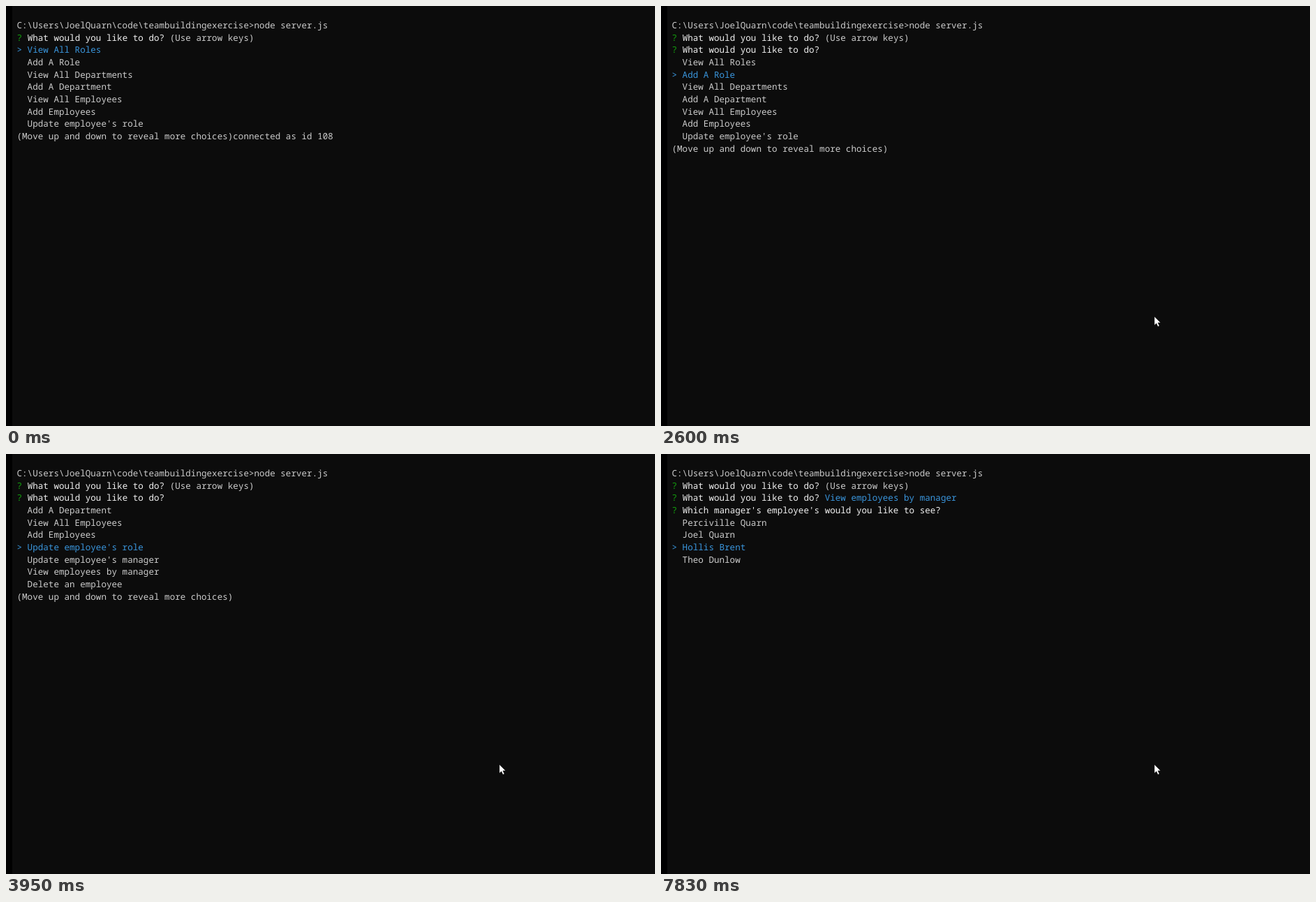
These frames come from a looping animation (930x602 px, 8 s). An HTML page:

```html
<!DOCTYPE html>
<html lang="en">
<head>
<meta charset="utf-8">
<title>Team menu in a terminal</title>
<style>
  html, body { margin: 0; width: 100%; height: 100%; overflow: hidden; background: #0c0c0c; }
  svg { display: block; }
  text {
    font: 12.6px "Noto Sans Mono", "DejaVu Sans Mono", monospace;
    white-space: pre;
    text-rendering: geometricPrecision;
    fill: #ccc;
  }
  .green { fill: #13a10e; }
  .white { fill: #f2f2f2; }
  .blue { fill: #3a96dd; }
</style>
</head>
<body>
<svg width="930" height="602" viewBox="0 0 930 602">
  <rect width="930" height="602" fill="#0c0c0c"/>
  <rect width="9" height="602" fill="#000"/>
  <g id="screen"></g>
  <circle id="click" cx="706.5" cy="443" r="10.2" fill="#7f7f06"/>
  <path id="pointer" d="M0 0V12.6L2.9 9.9L5 14.6L7.2 13.6L5.1 9H9Z" fill="#fff" stroke="#000" stroke-width=".5"/>
</svg>
<script>
const LOOP = 8000;
const LEFT = 15.5, BASELINE = 32, LINE = 17.65;
const NS = "http://www.w3.org/2000/svg";
const $ = id => document.getElementById(id);

const actions = [
  "View All Roles", "Add A Role", "View All Departments", "Add A Department",
  "View All Employees", "Add Employees", "Update employee's role",
  "Update employee's manager", "View employees by manager",
  "Delete an employee", "Delete a role", "Delete a department"
];
const managers = ["Perciville Quarn", "Joel Quarn", "Hollis Brent", "Theo Dunlow"];

// A line is a list of [text, colour] runs.
const plain = text => [[text]];
const ask = (question, tail = "", colour = "") =>
  [["? ", "green"], [question + " ", "white"], [tail, colour]];
const choices = (items, selected) => items.map((item, i) =>
  i === selected ? [["> " + item, "blue"]] : plain("  " + item));

const HINT = "(Use arrow keys)";
const MORE = "(Move up and down to reveal more choices)";
const TODO = "What would you like to do?";
const WHICH = "Which manager's employee's would you like to see?";
const header = [
  plain("C:\\Users\\JoelQuarn\\code\\teambuildingexercise>node server.js"),
  ask(TODO, HINT)
];

const start = () => [
  ...header, ...choices(actions.slice(0, 7), 0), plain(MORE + "connected as id 108")
];
const menu = selected => {
  const top = Math.max(0, selected - 3);
  return [...header, ask(TODO),
    ...choices(actions.slice(top, top + 7), selected - top), plain(MORE)];
};
const pick = (selected, hint) => [
  ...header, ask(TODO, actions[8], "blue"), ask(WHICH, hint), ...choices(managers, selected)
];

const screens = [
  [0, start()],
  ...[2600, 2920, 3240, 3460, 3630, 3950, 4410, 4710].map((t, i) => [t, menu(i + 1)]),
  [6500, pick(0, HINT)],
  [7350, pick(1)],
  [7830, pick(2)]
];

// Time and share of the way from the bottom edge to the resting place.
const glide = [[70, 0], [140, 0.5], [220, 0.86], [290, 1]];
const from = [818, 590], to = [707, 445];

const current = (steps, t) => steps.findLast(step => step[0] <= t);

function node(name, parent) {
  return parent.appendChild(document.createElementNS(NS, name));
}

function showLines(lines) {
  $("screen").replaceChildren();
  lines.forEach((runs, row) => {
    const text = node("text", $("screen"));
    text.setAttribute("x", LEFT);
    text.setAttribute("y", BASELINE + row * LINE);
    for (const [content, colour] of runs) {
      const span = node("tspan", text);
      span.textContent = content;
      if (colour) span.setAttribute("class", colour);
    }
  });
}

let shown;
function draw(t) {
  const lines = current(screens, t)[1];
  if (lines !== shown) showLines(shown = lines);

  const step = current(glide, t);
  $("pointer").style.display = step ? "" : "none";
  if (step) {
    const [x, y] = from.map((a, i) => a + (to[i] - a) * step[1]);
    $("pointer").setAttribute("transform", `translate(${x} ${y})`);
  }
  $("click").style.display = t >= 1910 && t < 1990 ? "" : "none";
}

const begin = performance.now();
function tick() {
  draw((performance.now() - begin) % LOOP);
  requestAnimationFrame(tick);
}
tick();
</script>
</body>
</html>
```
